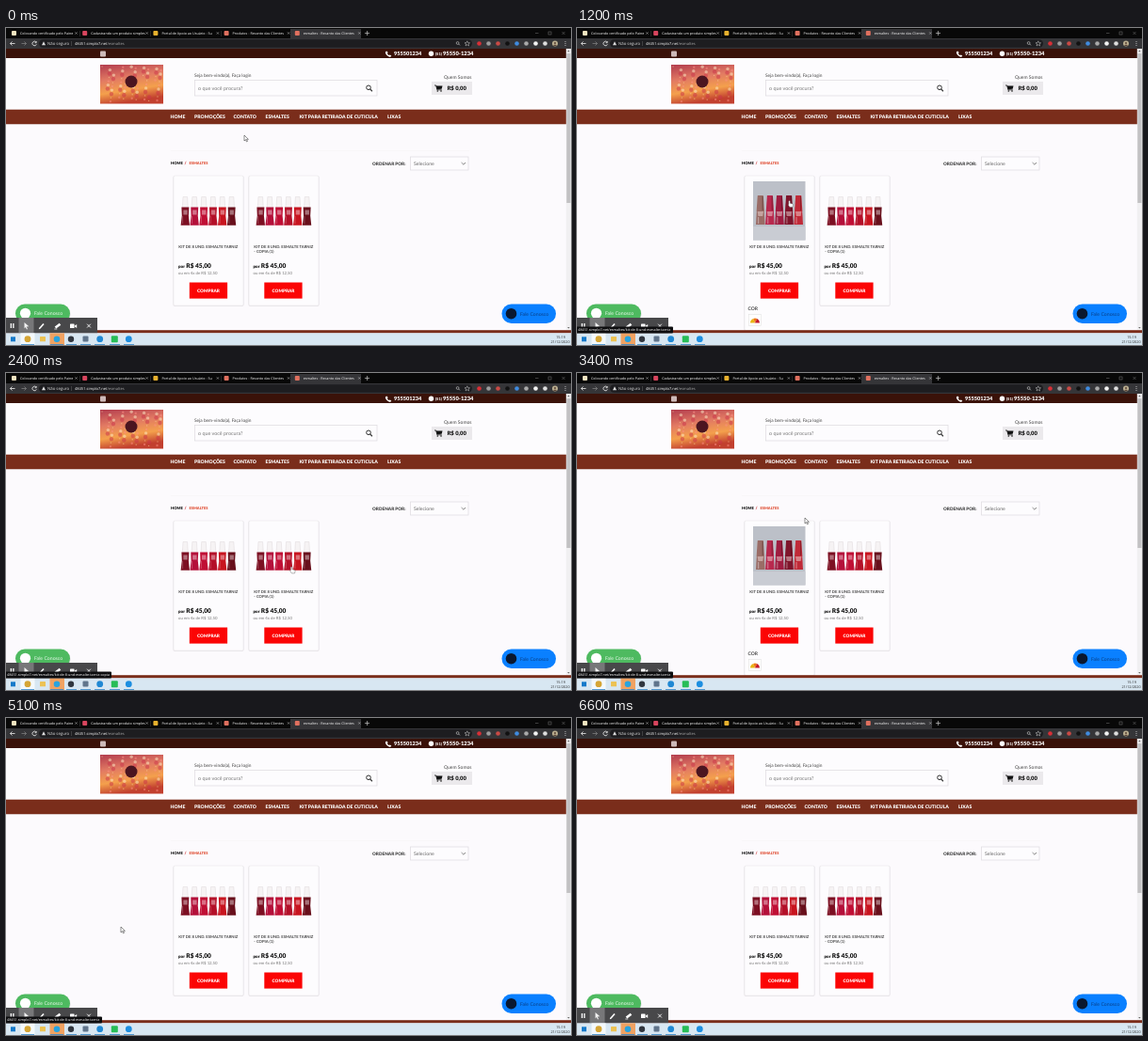
These frames come from a looping animation (600x337 px, 7.4 s). An HTML page:

```html
<!DOCTYPE html>
<html lang="pt-BR">
<head>
<meta charset="utf-8">
<title>Esmaltes</title>
<style>
html, body { margin: 0; width: 100%; height: 100%; overflow: hidden; background: #fcfafd; }
svg { display: block; width: 100%; height: 100%; }
text { font-family: Lato, sans-serif; text-rendering: geometricPrecision; white-space: pre; }
.ui { font-family: "Open Sans", sans-serif; }
.b { font-weight: 700; }
.k { font-weight: 900; }
</style>
</head>
<body>
<svg id="stage" viewBox="0 0 600 337" xmlns="http://www.w3.org/2000/svg"></svg>
<script>
const LOOP = 7400, STEP = 100;
const BROWN = '#7a2d1b';

const rect = (x, y, w, h, fill, more = '') =>
  `<rect x="${x}" y="${y}" width="${w}" height="${h}" fill="${fill}" ${more}/>`;
const dot = (x, y, r, fill, more = '') => `<circle cx="${x}" cy="${y}" r="${r}" fill="${fill}" ${more}/>`;
const line = (d, stroke, w = 0.8, more = '') =>
  `<path d="${d}" fill="none" stroke="${stroke}" stroke-width="${w}" ${more}/>`;
const shape = (d, fill, more = '') => `<path d="${d}" fill="${fill}" ${more}/>`;
const text = (x, y, s, size, fill, cls = '', anchor = 'start') =>
  `<text x="${x}" y="${y}" font-size="${size}" fill="${fill}" class="${cls}" text-anchor="${anchor}">${s}</text>`;
const group = (id, body, more = '') => `<g id="${id}" ${more}>${body}</g>`;
const cross = (x, y, r, c, w) => line(`M${x - r} ${y - r}l${2 * r} ${2 * r}m0 ${-2 * r}l${-2 * r} ${2 * r}`, c, w);
const lens = (x, y, r, c, w) => dot(x, y, r, 'none', `stroke="${c}" stroke-width="${w}"`) +
  line(`M${x + r * 0.7} ${y + r * 0.7}l${r} ${r}`, c, w * 1.2);

function browser() {
  const tabs = [
    ['Colocando certificado pelo Paine', '#f3e3c0'],
    ['Cadastrando um produto simples', '#d8455e'],
    ['Portal de Apoio ao Usuário - Su', '#e8b12e'],
    ['Produtos - Recanto das Clientes', '#e0705f'],
    ['esmaltes - Recanto das Clientes', '#e0705f']
  ];
  let s = rect(0, 0, 600, 11.5, '#080808') + rect(302, 1, 75, 10.5, '#353538') + rect(0, 11, 600, 11, '#353538');
  tabs.forEach(([name, c], i) => {
    const x = 6 + i * 75.2;
    s += rect(x, 3, 5, 5, c, 'rx="1"') + text(x + 9, 7, name, 3.7, '#fff', 'ui');
    s += cross(x + 68.5, 5.5, 1.1, '#ccc', 0.5);
    if (i < 3) s += rect(x + 72, 3, 0.4, 6, '#555');
  });
  s += line('M381 5.5h5m-2.5 -2.5v5', '#ddd', 0.6);
  s += line('M562 5.5h3.5', '#777', 0.5) + rect(576, 4, 3, 3, 'none', 'stroke="#777" stroke-width=".5"') + cross(592, 5.5, 1.5, '#777', 0.5);
  s += rect(35, 12.3, 460, 8.4, '#1d1d20', 'rx="4.2"');
  s += line('M9.5 16.5h-5m2 -2l-2 2l2 2', '#eee', 0.8) + line('M16.5 16.5h5m-2 -2l2 2l-2 2', '#888', 0.7);
  s += line('M32 15a2.3 2.3 0 1 0 .4 2.3m-.2 -3.3v1.7h-1.7', '#eee', 0.8);
  s += shape('M40 14.3l2 4h-4z', '#ddd') + text(44, 18, 'Não seguro', 4.3, '#ddd', 'ui') + rect(69.6, 14, 0.4, 5, '#777');
  s += `<text x="73" y="18" font-size="4" class="ui" fill="#fff">48451.simplo7.net<tspan fill="#aaa">/esmaltes</tspan></text>`;
  s += lens(479.6, 16, 1.4, '#ccc', 0.6);
  s += shape('M489.8 13.8l.8 1.9l2 .1l-1.6 1.2l.6 2l-1.8 -1.2l-1.8 1.2l.6 -2l-1.6 -1.2l2 -.1z', 'none', 'stroke="#ccc" stroke-width=".5"');
  ['#d92f36', '#9c9c9c', '#c94a45', '#111', '#3f8be0', '#a9a9a9', '#f2f2f2', '#ddd'].forEach((c, i) => {
    s += dot(502.5 + i * 10, 16.5, 2.3, c);
  });
  return s + dot(583, 16.5, 3, '#b9ad8f') + shape('M581 19q2 -3 4 0z', '#5c4638') + dot(583, 16, 1.1, '#5c4638') +
    [14.5, 16.5, 18.5].map(y => dot(594, y, 0.5, '#ddd')).join('');
}

function header() {
  let s = rect(0, 22, 600, 10, '#3a1209') + rect(0, 32, 600, 55, '#fdfcfe');
  s += rect(100, 24.5, 6, 6, '#cdb9b8', 'rx="1"');
  s += shape('M404.2 24.4l1.4 1.6l-.7 1.2q.6 1.2 1.8 1.9l1.2 -.7l1.4 1.3q-.8 1.4 -2.2 1q-3.7 -1.6 -4.3 -4.6q0 -1.2 1.4 -1.7z', '#fff');
  s += text(412, 29.4, '955501234', 5.6, '#fff', 'k') + dot(451.5, 27.2, 2.7, '#fff');
  s += text(456, 29, '(51)', 4, '#fff', 'k') + text(464, 29.4, '95550-1234', 5.8, '#fff', 'k');

  // bokeh picture
  s += rect(100, 39, 67, 41.5, 'url(#glow)');
  for (let i = 0; i < 70; i++) {
    const x = 102 + (i * 37.7) % 63, y = 41 + (i * 23.3) % 37.5;
    s += dot(x.toFixed(1), y.toFixed(1), 0.7 + i % 4 * 0.5, ['#ffe0a0', '#ff8f86', '#fff0cc', '#c9324a'][i % 4], 'opacity=".5"');
  }
  s += dot(133, 57, 6.5, '#4b1520');

  s += text(200, 51.6, 'Seja bem-vindo(a), Faça login', 4.8, '#444');
  s += rect(200.5, 55.5, 193.5, 16.5, '#fdfcfe', 'stroke="#dddbdf" stroke-width=".7"');
  s += text(204, 65.8, 'o que você procura?', 5.4, '#777') + lens(385, 63.3, 2.3, '#333', 1);
  s += text(494.5, 53.7, 'Quem Somos', 5, '#444', '', 'end');
  s += rect(452, 57, 43, 14, '#ebe9ec');
  s += line('M455 61h1.7l1.2 4.8h4.8', '#111', 0.8) + shape('M456.7 61.4h6.8l-.8 3.4l-5 .5z', '#111') + dot(458.3, 67, 0.8, '#111') + dot(462, 67, 0.8, '#111');
  s += text(468.5, 66.2, 'R$ 0,00', 5.9, '#111', 'k');

  s += rect(0, 86.7, 600, 15.5, BROWN) + rect(0, 102.2, 600, 0.8, '#d8c5c2');
  [['HOME', 174.5], ['PROMOÇÕES', 200], ['CONTATO', 241.5], ['ESMALTES', 275.5],
   ['KIT PARA RETIRADA DE CUTICULA', 311.5], ['LIXAS', 405]].forEach(([n, x]) => {
    s += text(x, 96.2, n, 5.1, '#fff', 'k');
  });
  return s;
}

function filters() {
  return rect(175, 130.3, 317, 0.5, '#f2f0f3') +
    text(175, 144.9, 'HOME', 4.1, '#111', 'k') + text(189.5, 144.9, '/', 4.4, '#c33', 'k') +
    text(194.5, 144.9, 'ESMALTES', 4, '#df4a2f', 'k') +
    text(389, 145.6, 'ORDENAR POR:', 4.7, '#444', 'k') +
    rect(429.5, 137, 61.5, 14, '#fdfcfe', 'stroke="#dddbdf" stroke-width=".7"') +
    text(433, 145.8, 'Selecione', 5.2, '#666') + line('M483.6 143l2.2 2.2l2.2 -2.2', '#555', 0.7);
}

function bottles(x0) {
  return ['#7c0f22', '#b4103a', '#c00f35', '#b41029', '#c8141f', '#68101c'].map((c, i) => {
    const x = x0 + i * 9.85;
    return shape(`M${x + 2} 179.5h4.6l.7 11.5h-6z`, '#f6f3f4', 'stroke="#d6cfd2" stroke-width=".4"') +
      shape(`M${x + 0.4} 190.5h8l-.5 9l1.1 10.3h-9.4l1.2 -10.3z`, c) +
      rect(x + 2.3, 193.5, 4.4, 5, '#fff', 'opacity=".4"') + rect(x + 1.2, 200, 0.9, 8, '#fff', 'opacity=".25"');
  }).join('');
}

function photo() {
  let s = rect(187, 163, 55.5, 62.5, '#bcc0c8') + rect(187, 211, 55.5, 14.5, '#c9ccd3');
  ['#9a6c66', '#b8294e', '#9f1c40', '#7f152c', '#c02a38'].forEach((c, i) => {
    const x = 190 + i * 10.1;
    s += shape(`M${x + 1.8} 178h6l1.2 17h-8.4z`, c) + shape(`M${x + 0.8} 195h8l.8 14h-9.6z`, c) +
      shape(`M${x + 1.6} 195h6.4l-.8 5h-4.8z`, '#efd9d8', 'opacity=".5"') +
      rect(x + 6.6, 179, 1.2, 15, '#200', 'opacity=".3"') + rect(x + 2, 201, 1.2, 7, '#fff', 'opacity=".35"');
  });
  return s;
}

function frameBox(x, h) {
  return rect(x - 0.7, 157, 75.4, h + 1, '#ebe8ec', 'rx="2"') + rect(x, 157, 74, h, '#fdfcfe', 'rx="1.5" stroke="#e4e1e5" stroke-width=".5"');
}

function offer(x) {
  return text(x + 5, 255.2, 'por', 4.5, '#111', 'k') + text(x + 13.3, 255.2, 'R$ 45,00', 6.6, '#111', 'k') +
    text(x + 5, 262.3, 'ou em 4x de R$ 12,50', 4.3, '#777') +
    rect(x + 16.8, 270.5, 40.3, 17.1, '#fb0505') + text(x + 37, 280.9, 'COMPRAR', 4.7, '#fff', 'k', 'middle');
}

function cards() {
  const title = 'KIT DE 8 UND. ESMALTE TARNIZ';
  const colors = text(181.5, 299.6, 'COR', 5, '#444', 'b') +
    rect(182.5, 304.5, 13, 12, '#fff', 'stroke="#ddd" stroke-width=".5"') +
    shape('M184 313.5a5 5 0 0 1 3.2 -4.6l1.8 4.6z', '#e8b413') +
    shape('M187.2 308.9a5 5 0 0 1 4 .2l-2.2 4.4z', '#f07a16') +
    shape('M191.2 309.1a5 5 0 0 1 2.8 4.4h-5z', '#c3182a');
  return group('plain', frameBox(178, 138) + bottles(186)) +
    group('hover', frameBox(178, 164.5) + photo() + colors) +
    text(183.3, 233.7, title, 4.2, '#444', 'b') + offer(178) +
    frameBox(258, 138) + bottles(266) +
    text(263.3, 233.7, title, 4.2, '#444', 'b') + text(263.3, 238.8, '- COPIA (1)', 4.2, '#444', 'b') + offer(257.5);
}

function scrollbar() {
  return rect(594.8, 22, 5.2, 299.3, '#f1f0f2') + rect(595.3, 27, 4.2, 159, '#c2c1c3') +
    shape('M597.4 23.6l1.3 1.6h-2.6z', '#666') + shape('M597.4 319.6l1.3 -1.6h-2.6z', '#666');
}

function widgets() {
  let s = rect(10.5, 294.5, 58, 20, '#000', 'rx="10" opacity=".12"') + rect(10, 293.5, 58, 19.8, '#4eba60', 'rx="9.9"');
  s += dot(20.5, 303.3, 5.6, '#fff') + text(30, 305.3, 'Fale Conosco', 5.2, '#e9f8eb');
  s += rect(526.5, 293.5, 57.5, 20.5, '#0a80ff', 'rx="10.2"') + dot(536.5, 303.7, 5.8, '#0a1830');
  s += text(546, 305.5, 'Fale Conosco', 5.2, '#0a3f86');
  s += rect(0, 321.2, 600, 3.2, BROWN);
  // recorder toolbar
  s += rect(0, 308, 97, 16.5, '#48484a') + rect(13.5, 308, 16, 16.5, '#777779');
  s += rect(4.7, 314, 1.3, 5, '#fff') + rect(7.2, 314, 1.3, 5, '#fff');
  s += shape('M19.5 313l4.8 4.3l-2.6 .2l1.3 2.4l-1 .5l-1.2 -2.4l-1.3 1.4z', '#f2f2f2');
  s += line('M36 319l4 -4.6', '#fff', 1.6) + shape('M34.8 320.3l.4 -2l1.6 1.4z', '#fff');
  s += line('M52.5 318.5l5 -3.8', '#fff', 2.6) + line('M51.3 320h3', '#fff', 0.7);
  s += rect(68, 314.5, 4.6, 4.6, '#fff', 'rx=".6"') + shape('M73 316.4l2.2 -1.5v4l-2.2 -1.5z', '#fff');
  return s + cross(88, 316.6, 1.9, '#fff', 0.9);
}

function taskbar() {
  let s = rect(0, 324.4, 600, 12.6, '#d8e7f2');
  s += rect(15.5, 324.4, 15, 12.6, '#f4f9fc') + rect(46.5, 324.4, 15.5, 12.6, '#f0a262');
  s += rect(5, 328.3, 5, 5, '#1579c9');
  s += dot(23, 330.7, 3.4, '#d5a535') + rect(36, 328, 6, 5.2, '#ecc254', 'rx=".5"') + dot(54, 330.7, 3.3, '#28a3df');
  s += dot(69, 330.7, 3.2, '#30363f') + rect(81.5, 327.6, 6, 6, '#60758c', 'rx="1"');
  s += dot(99.7, 330.7, 3.4, '#2088d3') + rect(111.8, 327.2, 7, 7, '#27bd57', 'rx="1"') + dot(130.3, 330.7, 3.4, '#1d8ee0');
  [[16, 14], [47, 14], [64, 11], [79, 11], [94, 11], [110, 11], [125, 11]].forEach(([x, w]) => {
    s += rect(x, 336.2, w, 0.8, '#3386ca');
  });
  return s + text(589, 330, '15:19', 3.8, '#222', 'ui', 'middle') + text(588.5, 335, '21/12/2020', 3.8, '#222', 'ui', 'middle');
}

const defs = `<defs><linearGradient id="glow" x2=".25" y2="1">
  <stop offset="0" stop-color="#b23c4e"/><stop offset=".4" stop-color="#e27a63"/>
  <stop offset=".72" stop-color="#f4a04c"/><stop offset="1" stop-color="#c2402f"/>
</linearGradient></defs>`;

const status = group('status', rect(-1, 317.6, 103, 6.9, '#0d0d0f', 'id="bubble" rx="1"') +
  text(1, 322.3, '', 3.75, '#fff', 'ui').replace('<text', '<text id="link"'));
const arrow = shape('M0 0v6l1.5 -1.3l1 2.2l1 -.5l-1 -2.1h1.9z', '#fff', 'id="arrow" stroke="#222" stroke-width=".5"');
const hand = shape('M1 0q.9 0 .9 .8v2l2.6 .6q.7 .3 .6 1l-.5 2.5h-3.2l-1.7 -2.3q0 -.7 .6 -.6v-3.2q0 -.8 .7 -.8z', '#fff', 'id="hand" stroke="#444" stroke-width=".4"');

const $ = id => document.getElementById(id);
$('stage').innerHTML = defs + rect(0, 0, 600, 337, '#fcfafd') + browser() + header() + filters() +
  cards() + scrollbar() + widgets() + taskbar() + status + group('cursor', arrow + hand);

// pointer tip: time, x, y
const path = [
  [0, 253, 114], [300, 242, 142], [600, 222, 182], [800, 219, 192], [1000, 219, 192], [1400, 230, 175],
  [1500, 230, 175], [1700, 244.5, 130], [1900, 253, 137], [2300, 302, 206], [2600, 302, 206],
  [2700, 217, 184], [3000, 217, 184], [3400, 242, 154], [3600, 245, 147], [3800, 243, 150],
  [4000, 243, 150], [4100, 239, 160], [4600, 224, 184], [4800, 224, 184], [5100, 122, 222],
  [5600, 54, 274], [5900, -1, 244], [6100, -1, 244], [6200, -9, 244]
];
const overFirst = [[400, 1600], [3100, 3500], [4200, 5000]];
const links = [[1100, 1800, 0], [2200, 2400, 0], [2400, 3100, 1], [3100, 3700, 0], [4400, 5300, 0]];
const url = '48451.simplo7.net/esmaltes/kit-de-8-und-esmalte-tarniz';
const within = t => ([a, b]) => t >= a && t < b;
const show = (id, on) => $(id).setAttribute('visibility', on ? 'visible' : 'hidden');

function tip(t) {
  const i = path.findIndex(p => p[0] > t);
  if (i < 0) return path[path.length - 1].slice(1);
  const [t0, x0, y0] = path[i - 1], [t1, x1, y1] = path[i];
  const u = (t - t0) / (t1 - t0);
  return [x0 + (x1 - x0) * u, y0 + (y1 - y0) * u];
}

function draw(t) {
  const [x, y] = tip(t), over = overFirst.some(within(t)), link = links.find(within(t));
  const onLink = y > 163 && y < 290 && (over || (x > 259 && x < 331));
  show('hover', over);
  show('plain', !over);
  show('arrow', !onLink);
  show('hand', onLink);
  $('cursor').setAttribute('transform', `translate(${x.toFixed(2)} ${y.toFixed(2)})`);
  show('status', link);
  if (link) {
    $('link').textContent = url + (link[2] ? '-copia' : '');
    $('bubble').setAttribute('width', link[2] ? 113 : 103);
    $('status').setAttribute('opacity', t >= 1700 && t < 1800 ? 0.45 : 1);
  }
}

const start = performance.now();
function tick(now) {
  const t = Math.max(0, now - start) % LOOP;
  draw(Math.floor(t / STEP) * STEP);
  requestAnimationFrame(tick);
}
draw(0);
requestAnimationFrame(tick);
</script>
</body>
</html>
```
